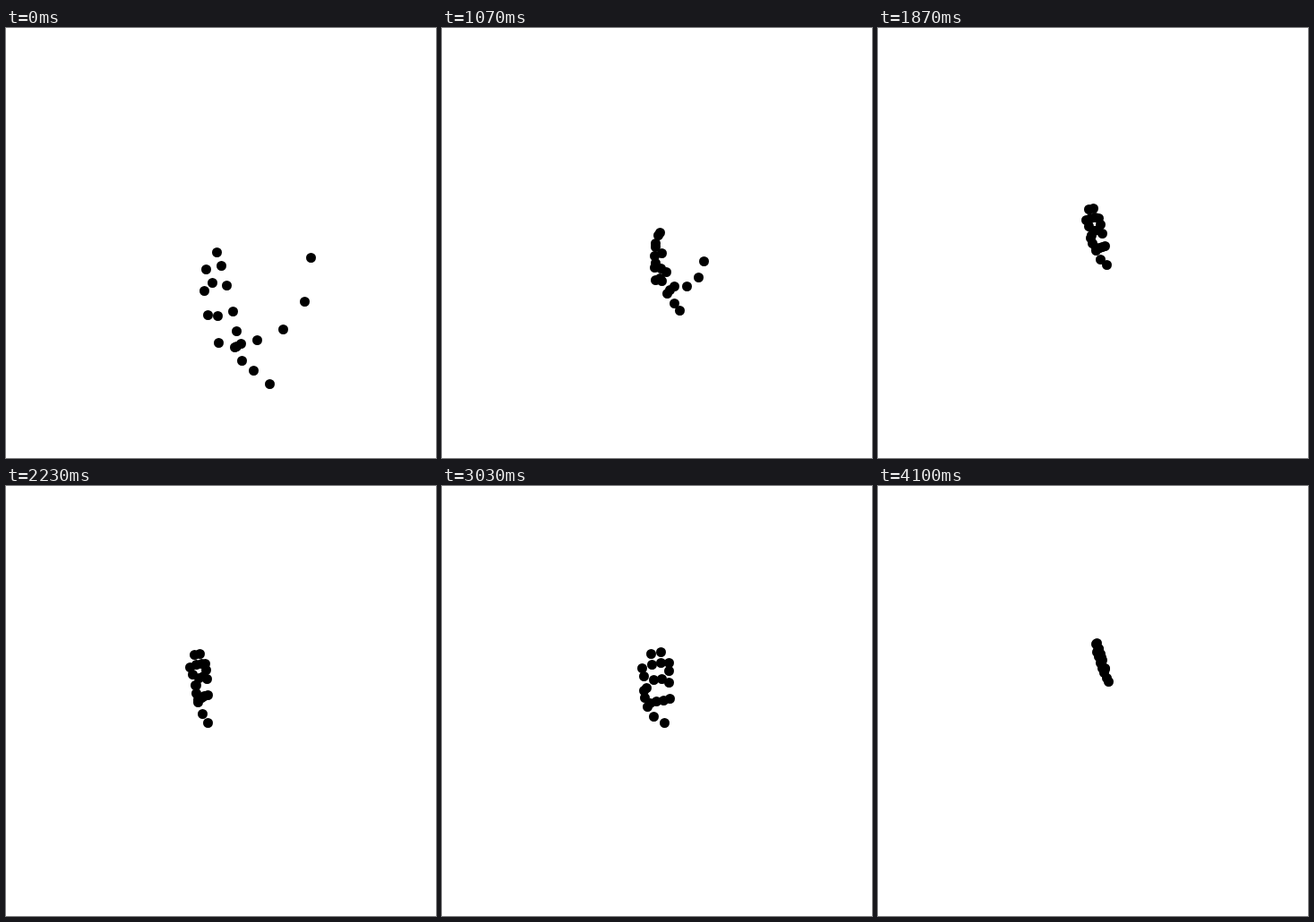
Write an HTML page with a canvas that moves like this. It is 480x480 px and loops after 4.13 s.

```html
<!DOCTYPE html>
<html lang="en">
<head>
<meta charset="utf-8">
<title>Hand joints</title>
<style>
html, body { margin: 0; width: 100%; height: 100%; overflow: hidden; background: #fff; }
canvas { display: block; }
</style>
</head>
<body>
<canvas width="480" height="480"></canvas>
<script>
const ctx = document.querySelector('canvas').getContext('2d');
const LOOP = 4130;

// Four joints of a digit: each bone turns by curl degrees and scales by ratio.
function digit(x, y, angle, curl, bone, ratio) {
  const joints = [[x, y]];
  for (let i = 0; i < 3; i++) {
    const turn = (angle + i * curl) * Math.PI / 180;
    x += bone * Math.cos(turn);
    y += bone * Math.sin(turn);
    joints.push([x, y]);
    bone *= ratio;
  }
  return joints;
}

// A hand is a wrist, a thumb and four fingers, in that order.
const hand = (x, y, ...digits) => [[x, y], ...digits.flat()];
const fingers = make => [0, 1, 2, 3].map(make);

const start = hand(294, 397,
  digit(276, 382, -138, 25, 17, 1),
  digit(237, 351, -112, 14, 33, .85),
  digit(255, 356, -118, 18, 40, .93),
  digit(262, 352, -104, 0, 37.6, .78),
  digit(280, 348, -22, -30, 31, 1.27));

const closing = hand(265, 315,
  digit(259, 307, -126, 15, 14.4, 1),
  digit(238, 281, -94, 4, 13.7, 1),
  digit(243, 279, -107, 17, 18, .97),
  digit(254, 292, -102, 0, 20.8, 1),
  digit(259, 288, 0, -36, 14, 1.17));

const fist = hand(159, 229,
  digit(164, 216, -75, 8, 15.5, .8),
  ...fingers(k => digit(165 - 2 * k, 200 - 4.5 * k, -40 - 4 * k, -60 + 38 * k, 15, .4)));

const open = hand(248, 264,
  digit(236, 257, -122, 13, 13, .8),
  ...fingers(k => digit(232 + 7.3 * k, 242 - 1.7 * k,
    -92 - 1.3 * (3 - k) ** 2, 0, 24.8 - 3.1 * (k - 1.5) ** 2, .72)));

const mix = (p, q, k) => p.map(([x, y], i) => [x + (q[i][0] - x) * k, y + (q[i][1] - y) * k]);

// The open hand turned and scaled about its wrist, which is put at (wx, wy).
const turned = (wx, wy, a, b, c, d) => open.map(([x, y]) => {
  const u = x - open[0][0], v = y - open[0][1];
  return [wx + a * u + b * v, wy + c * u + d * v];
});

const keys = [
  [0, start],
  [1600, mix(start, closing, 1600 / 1070)],
  [1870, turned(255, 264, .5, .165, .08, .79)],
  [2130, turned(246, 275, .75, .19, .1, 1.06)],
  [2567, fist],
  [3033, open],
  [3070, turned(255, 267, 1.05, 0, 0, 1.03)],
  [3667, turned(261, 222, .5, .17, .05, .58)],
  [4100, turned(257, 218, .1, .165, 0, .545)]
];

function poseAt(t) {
  const i = Math.max(1, keys.findIndex(k => k[0] >= t));
  const [t0, p] = keys[i - 1], [t1, q] = keys[i];
  return mix(p, q, (t - t0) / (t1 - t0));
}

function draw() {
  // 30 steps per second
  const step = Math.floor((performance.now() % LOOP + 3.4) * .03);
  ctx.fillStyle = '#fff';
  ctx.fillRect(0, 0, 480, 480);
  ctx.fillStyle = '#000';
  for (const [x, y] of poseAt(Math.min(step / .03, 4100))) {
    ctx.beginPath();
    ctx.arc(Math.round(x) + .5, Math.round(y) + .5, 5.5, 0, 2 * Math.PI);
    ctx.fill();
  }
  requestAnimationFrame(draw);
}
draw();
</script>
</body>
</html>
```
